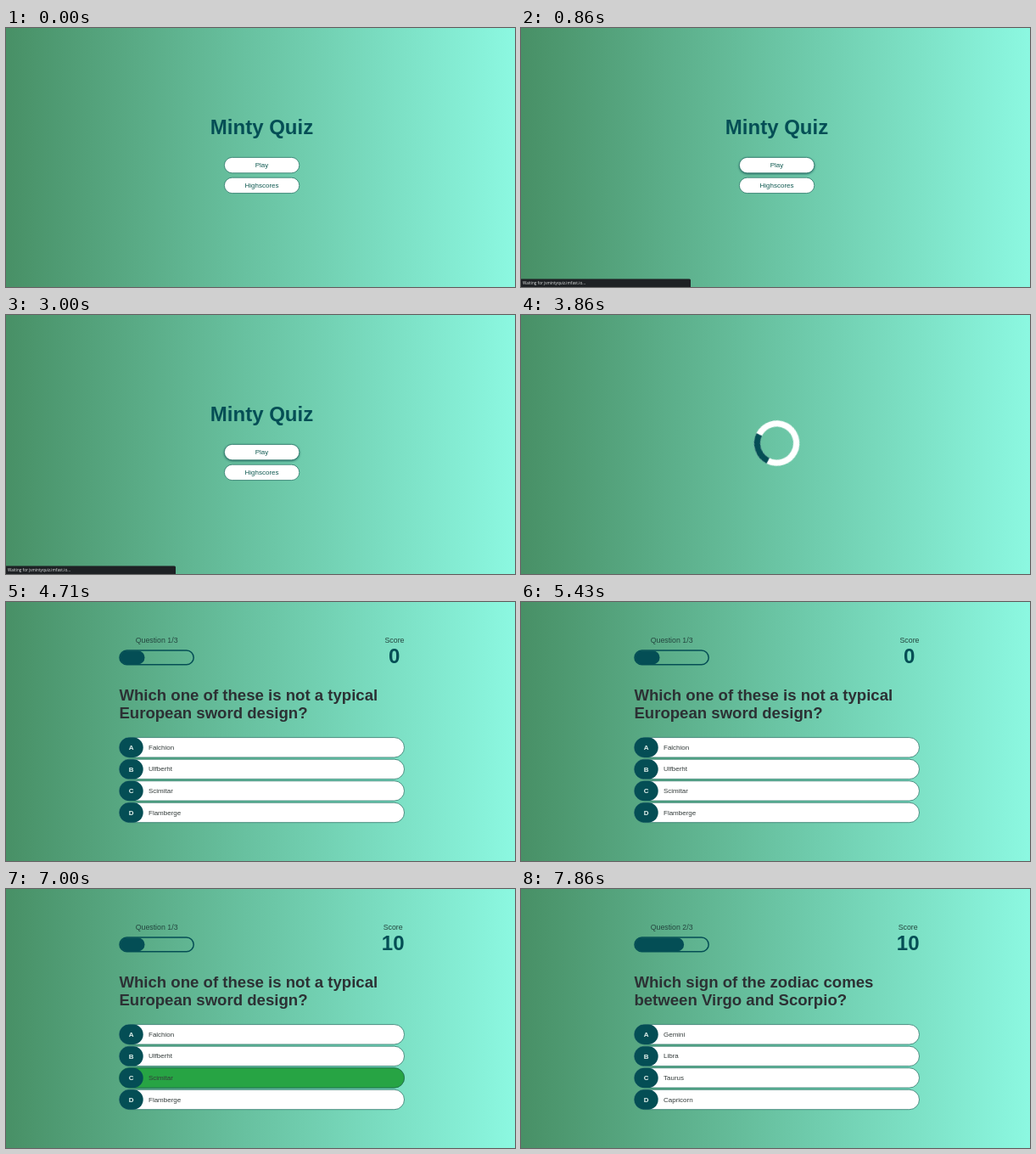
Recreate the animation shown at these times as an HTML page. Size 600 by 305 pixels, loop 8 s.

```html
<!DOCTYPE html>
<html lang="en">
<head>
<meta charset="utf-8">
<title>Minty Quiz</title>
<style>
  :root { --teal: #044e55; --loop: 8s step-end infinite; }
  html, body { margin: 0; width: 100%; height: 100%; overflow: hidden; }
  body { background: linear-gradient(to right, #489066, #8cf8e1); }
  svg { display: block; width: 600px; height: 305px; }
  text { font-family: "Liberation Sans", Arial, sans-serif; }
  .mid { text-anchor: middle; }

  .title { font-size: 24px; font-weight: bold; fill: var(--teal); }
  .btn { fill: #fff; stroke: #2a7568; stroke-width: .8; }
  .label { font-size: 8px; fill: #0e5850; }
  .shadow { fill: #023c42; opacity: .75; filter: blur(1.6px); }
  .status rect { fill: #1e2124; }
  .status text { font: 4.7px "Open Sans", sans-serif; fill: #e4e6e6; }

  .hud { font-size: 8.8px; fill: #24463f; }
  .score { font-size: 24px; font-weight: bold; fill: var(--teal); }
  .question { font-size: 18.6px; font-weight: bold; fill: #2c3134; }
  .letter { font-size: 8px; font-weight: bold; fill: #e4f3ee; }
  .answer { font-size: 8px; fill: #333b3a; }
  .dark { fill: var(--teal); }
  .frame { fill: none; stroke: var(--teal); stroke-width: 1.5; }

  .home { animation: home var(--loop); }
  .hover { animation: hover var(--loop); }
  .status { animation: status var(--loop); }
  .load { animation: load var(--loop); }
  .spin { transform-origin: 301.5px 151px; animation: spin 8s infinite; }
  .game { animation: game var(--loop); }
  .zero { animation: zero var(--loop); }
  .ten { animation: ten var(--loop); }
  .right { animation: right var(--loop); }
  .q1 { animation: q1 var(--loop); }
  .q2 { animation: q2 var(--loop); }
  .fill { animation: fill var(--loop); }

  @keyframes home { 0% { visibility: visible } 42.8%, 100% { visibility: hidden } }
  @keyframes hover { 0% { visibility: hidden } 7.1% { visibility: visible } 42.8%, 100% { visibility: hidden } }
  @keyframes status { 0% { visibility: hidden } 8.85% { visibility: visible } 42.8%, 100% { visibility: hidden } }
  @keyframes load { 0% { visibility: hidden } 42.8% { visibility: visible } 53.6%, 100% { visibility: hidden } }
  @keyframes spin {
    0% { transform: rotate(-6deg) }
    42.8% { transform: rotate(-6deg); animation-timing-function: steps(6, end) }
    53.6%, 100% { transform: rotate(148.8deg) }
  }
  @keyframes game { 0% { visibility: hidden } 53.6%, 100% { visibility: visible } }
  @keyframes zero { 0% { visibility: hidden } 53.6% { visibility: visible } 83.85%, 100% { visibility: hidden } }
  @keyframes ten { 0% { visibility: hidden } 83.85%, 100% { visibility: visible } }
  @keyframes right { 0% { visibility: hidden } 83.85% { visibility: visible } 96.35%, 100% { visibility: hidden } }
  @keyframes q1 { 0% { visibility: hidden } 53.6% { visibility: visible } 96.35%, 100% { visibility: hidden } }
  @keyframes q2 { 0% { visibility: hidden } 96.35%, 100% { visibility: visible } }
  @keyframes fill { 0% { width: 29px } 96.35%, 100% { width: 57.6px } }
</style>
</head>
<body>
<svg viewBox="0 0 600 305">
  <defs>
    <rect id="btn" x="257.4" width="88.4" height="18.4" rx="9.2"/>
    <rect id="row" x="133.5" width="336" height="23.4" rx="11.7"/>
    <rect id="pill" x="133.5" width="28.2" height="23.4" rx="11.7"/>
  </defs>

  <g class="home">
    <text class="title mid" x="301.5" y="125">Minty Quiz</text>
    <use class="shadow hover" href="#btn" y="153.4"/>
    <use class="btn" href="#btn" y="152.4"/>
    <use class="btn" href="#btn" y="176.2"/>
    <text class="label mid" x="301.5" y="164.2">Play</text>
    <text class="label mid" x="301.5" y="188">Highscores</text>
  </g>
  <g class="status">
    <path d="M0 295.5H198.500Q200 295.500 200 297V305H0Z" fill="#1e2124"/>
    <text x="2" y="302">Waiting for jsmintyquiz.imfast.io...</text>
  </g>

  <g class="load">
    <g class="spin" fill="none" stroke-width="7.2">
      <circle cx="301.5" cy="151" r="23.1" stroke="#fff"/>
      <circle cx="301.5" cy="151" r="23.1" stroke="#044e55" pathLength="4"
        stroke-dasharray="1 3" transform="rotate(45 301.5 151)"/>
    </g>
  </g>

  <g class="game">
    <rect class="frame" x="134" y="57" width="87.2" height="16.8" rx="8.4"/>
    <rect class="dark fill" x="134.5" y="57.5" width="29" height="15.8" rx="7.9"/>

    <use class="btn" href="#row" y="159.6"/>
    <use class="btn" href="#row" y="185.2"/>
    <use class="btn" href="#row" y="210.7"/>
    <use class="btn" href="#row" y="236.3"/>
    <use class="right" href="#row" y="210.7" fill="#27a444" stroke="#1c6f4c" stroke-width=".8"/>
    <g class="dark">
      <use href="#pill" y="159.6"/>
      <use href="#pill" y="185.2"/>
      <use href="#pill" y="210.7"/>
      <use href="#pill" y="236.3"/>
    </g>
    <g class="letter mid">
      <text x="147.6" y="174">A</text>
      <text x="147.6" y="199.6">B</text>
      <text x="147.6" y="225.1">C</text>
      <text x="147.6" y="250.7">D</text>
    </g>
  </g>

  <g class="zero">
    <text class="hud mid" x="458" y="47.6">Score</text>
    <text class="score mid" x="457.8" y="72">0</text>
  </g>
  <g class="ten">
    <text class="hud mid" x="456.2" y="47.6">Score</text>
    <text class="score mid" x="456.2" y="72">10</text>
  </g>

  <g class="q1">
    <text class="hud mid" x="177.6" y="47.6">Question 1/3</text>
    <g class="question">
      <text x="133.4" y="116.2">Which one of these is not a typical</text>
      <text x="133.4" y="137.4">European sword design?</text>
    </g>
    <g class="answer">
      <text x="168" y="173.8">Falchion</text>
      <text x="168" y="199.4">Ulfberht</text>
      <text x="168" y="224.9">Scimitar</text>
      <text x="168" y="250.5">Flamberge</text>
    </g>
  </g>
  <g class="q2">
    <text class="hud mid" x="177.6" y="47.6">Question 2/3</text>
    <g class="question">
      <text x="133.4" y="116.2">Which sign of the zodiac comes</text>
      <text x="133.4" y="137.4">between Virgo and Scorpio?</text>
    </g>
    <g class="answer">
      <text x="168" y="173.8">Gemini</text>
      <text x="168" y="199.4">Libra</text>
      <text x="168" y="224.9">Taurus</text>
      <text x="168" y="250.5">Capricorn</text>
    </g>
  </g>
</svg>
</body>
</html>
```
